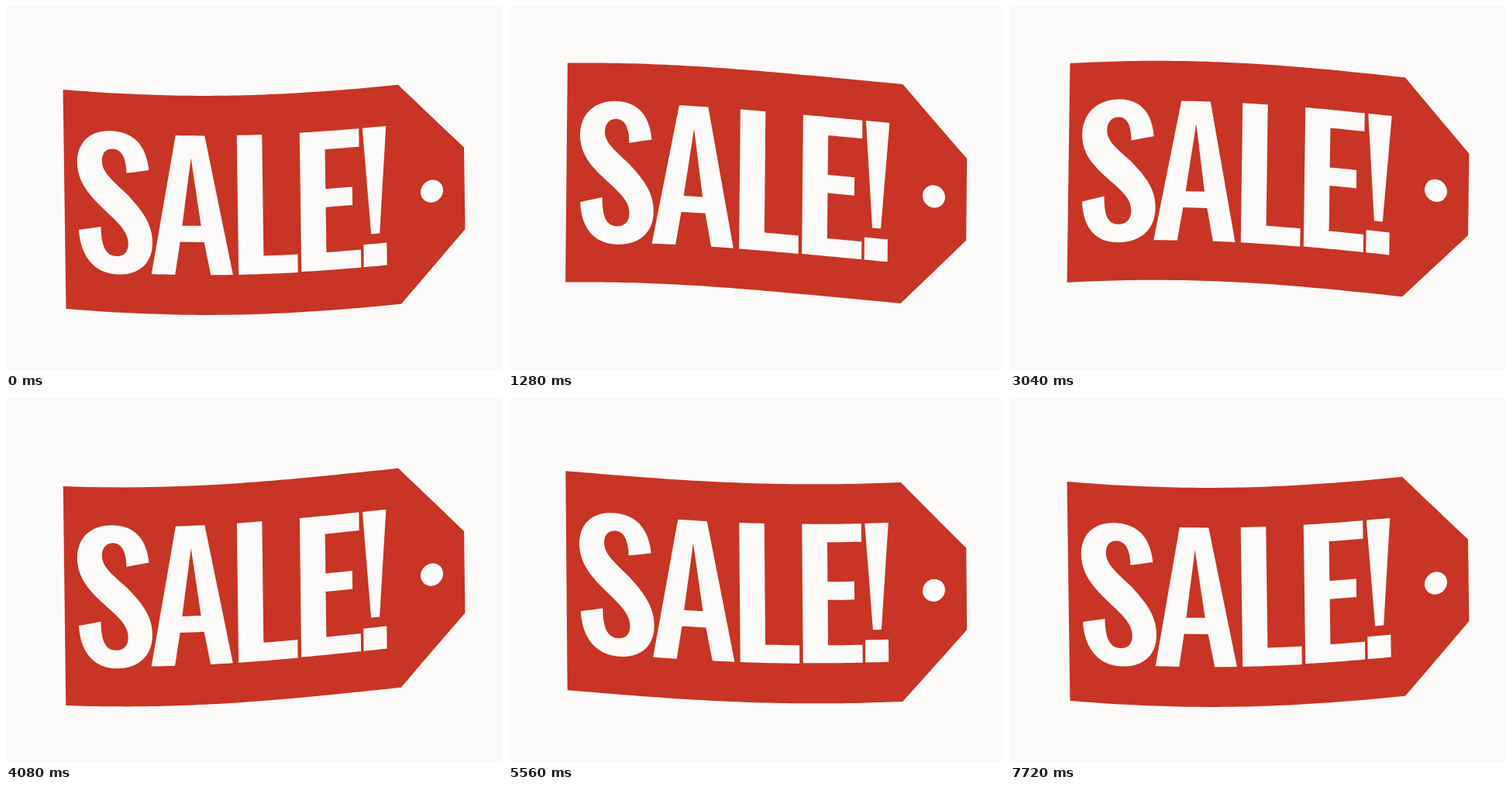
These frames come from a looping animation (640x470 px, 7760 ms). An HTML page:

```html
<!DOCTYPE html>
<html lang="en">
<head>
<meta charset="utf-8">
<title>Sale tag</title>
<style>
  html, body { margin: 0; width: 100%; height: 100%; overflow: hidden; background: #fcfaf8; }
  svg { display: block; width: 640px; height: 470px; }
  #tag { fill: #c83425; }
  #label { fill: #fcfaf8; }
</style>
</head>
<body>
<svg viewBox="0 0 640 470" role="img" aria-label="SALE!">
  <path id="tag"/>
  <path id="label"/>
</svg>
<script>
  const LOOP = 7760, STEP = 40, PERIOD = 1930;
  const RAD = Math.PI / 180;
  const WAVE = 0.2727 * RAD; // phase per pixel along the tag

  const rect = (x1, y1, x2, y2) => `M${x1} ${y1} L${x2} ${y1} L${x2} ${y2} L${x1} ${y2}`;

  // Artwork at rest
  const tag = 'M75.5 93.5 L508 93.5 L591.7 183 L591.7 288.5 L508 376.5 L75.5 376.5';
  const letterS = 'M185 191 C182 158 165 142.5 138 142.5 C110 142.5 92.5 160 92.5 186 ' +
    'C92.5 212 108 228 128 246 C146 262 157 272 157 287 C157 298 151 304 141 304 ' +
    'C128 304 122 293 122 267 L93.5 273 C95 307 112 327.5 142 327.5 ' +
    'C170 327.5 188.3 311 188.3 284 C188.3 260 176 244 157 224 C136 205 124.5 196 124.5 182 ' +
    'C124.5 172 130 165.5 139 165.5 C149 165.5 155.5 174 156 196';
  const letterA = 'M220 145 L257.5 145 L291.7 325 L263 325 L255 282.5 L224 282.5 ' +
    'L217 325 L186.5 325 M239.5 174 L227 261.5 L251.3 261.5';
  const letterL = 'M299 145 L331.5 145 L331.5 301.5 L375.5 301.5 L375.5 325 L299 325';
  const letterE = [
    rect(380, 145, 412.5, 324.5),
    rect(400, 145, 456.5, 168.5),
    rect(400, 219.5, 447, 243),
    rect(400, 301.5, 457, 324.5)
  ].join(' ');
  const bang = 'M461 145 L491.5 145 L481.5 282.5 L470.5 282.5 ' + rect(460.5, 295.5, 490.5, 324.5);

  const mix = (a, b, u) => a + (b - a) * u;
  const mixPt = (p, q, u) => [mix(p[0], q[0], u), mix(p[1], q[1], u)];

  function curvePt(pts, u) {
    while (pts.length > 1) pts = pts.slice(1).map((p, i) => mixPt(pts[i], p, u));
    return pts[0];
  }

  // Turn a path into closed, finely divided outlines
  function outline(path) {
    const shapes = [];
    let shape, last;
    const add = pts => {
      const [end] = pts.slice(-1);
      const span = Math.hypot(end[0] - last[0], end[1] - last[1]);
      const n = Math.max(pts.length > 1 ? 12 : 1, Math.ceil(span / 8));
      for (let i = 1; i <= n; i++) shape.push(curvePt([last, ...pts], i / n));
      last = end;
    };
    for (const [, cmd, args] of path.matchAll(/([MLC])([^MLC]+)/g)) {
      const v = args.trim().split(/\s+/).map(Number);
      const pts = [];
      for (let i = 0; i < v.length; i += 2) pts.push([v[i], v[i + 1]]);
      if (cmd === 'M') {
        if (shape) add([shape[0]]);
        last = pts[0];
        shape = [last];
        shapes.push(shape);
      } else add(pts);
    }
    add([shape[0]]);
    return shapes;
  }

  function circle(cx, cy, r) {
    return Array.from({ length: 48 }, (_, i) => {
      const a = i * 7.5 * RAD;
      return [cx + r * Math.cos(a), cy + r * Math.sin(a)];
    });
  }

  const tagShapes = outline(tag);
  const labelShapes = [letterS, letterA, letterL, letterE, bang].flatMap(outline);
  labelShapes.push(circle(549.5, 235, 14.5));

  // A running wave with a slight rocking of the whole tag
  function warp(phase) {
    const c = 21.8 * Math.cos(phase), s = 17.3 * Math.sin(phase);
    const lean = 4 / 283 * Math.cos(phase - 30 * RAD);
    return ([x, y]) => [
      x + lean * (y - 235),
      y + c * Math.cos(WAVE * (x - 149)) + s * Math.sin(WAVE * (x - 89))
    ];
  }

  const toPath = (shapes, bend) => shapes.map(shape =>
    'M' + shape.map(p => bend(p).map(n => n.toFixed(2)).join(' ')).join('L') + 'Z').join('');

  const tagEl = document.getElementById('tag');
  const labelEl = document.getElementById('label');
  let shown = -1;

  function draw(now) {
    const time = Math.floor(now % LOOP / STEP) * STEP;
    if (time !== shown) {
      shown = time;
      const bend = warp((42 - 360 * time / PERIOD) * RAD);
      tagEl.setAttribute('d', toPath(tagShapes, bend));
      labelEl.setAttribute('d', toPath(labelShapes, bend));
    }
  }

  const start = performance.now();
  function tick() {
    draw(performance.now() - start);
    requestAnimationFrame(tick);
  }
  tick();
</script>
</body>
</html>
```
